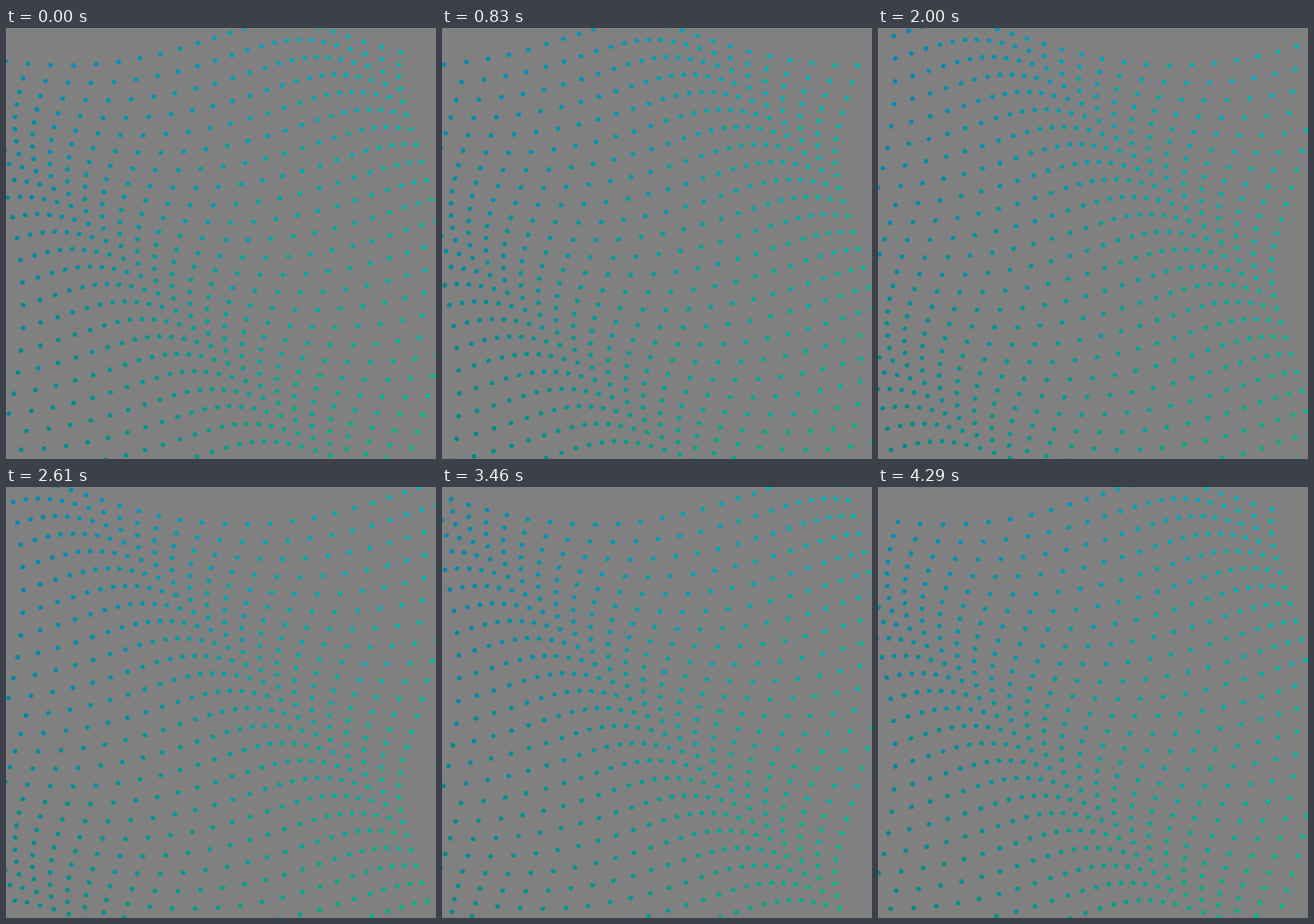
An HTML page with a canvas for the animation above (4.37 s loop, 505 by 506 pixels).

```html
<!DOCTYPE html>
<html lang="en">
<head>
<meta charset="utf-8">
<title>Dot wave</title>
<style>
  html, body { margin: 0; width: 100%; height: 100%; overflow: hidden; background: #808080; }
  canvas { display: block; width: 505px; height: 506px; }
</style>
</head>
<body>
<canvas id="stage" width="505" height="506"></canvas>
<script>
  const ctx = document.getElementById('stage').getContext('2d');
  const TAU = Math.PI * 2;
  const LOOP = 4370;
  const STEPS = 57;
  const LEAD = 14;          // ms by which each step comes early
  const COUNT = 25;         // dots per side, also one wavelength
  const GAP = 20.5;
  const LEFT = -5.1;
  const TOP = 18.6;
  const ORBIT = 25.5;
  const DOT = 2.7;
  const START = 0.03 - TAU * 10 / COUNT;

  const shade = k => Math.round(136 + 46 * k / (COUNT - 1));

  function drawDot(col, row, turn) {
    const angle = START + turn + TAU * (col - row) / COUNT;
    const x = LEFT + GAP * col + ORBIT * Math.cos(angle);
    const y = TOP + GAP * row - ORBIT * Math.sin(angle);
    ctx.fillStyle = `rgb(0, ${shade(col)}, ${shade(COUNT - 1 - row)})`;
    ctx.beginPath();
    ctx.arc(x, y, DOT, 0, TAU);
    ctx.fill();
  }

  function draw(now) {
    const step = Math.floor((now % LOOP + LEAD) / LOOP * STEPS);
    const turn = TAU * step / STEPS;
    ctx.fillStyle = '#808080';
    ctx.fillRect(0, 0, 505, 506);
    for (let row = 0; row < COUNT; row++) {
      for (let col = 0; col < COUNT; col++) drawDot(col, row, turn);
    }
  }

  const begin = performance.now();
  function tick() {
    draw(performance.now() - begin);
    requestAnimationFrame(tick);
  }
  tick();
</script>
</body>
</html>
```
